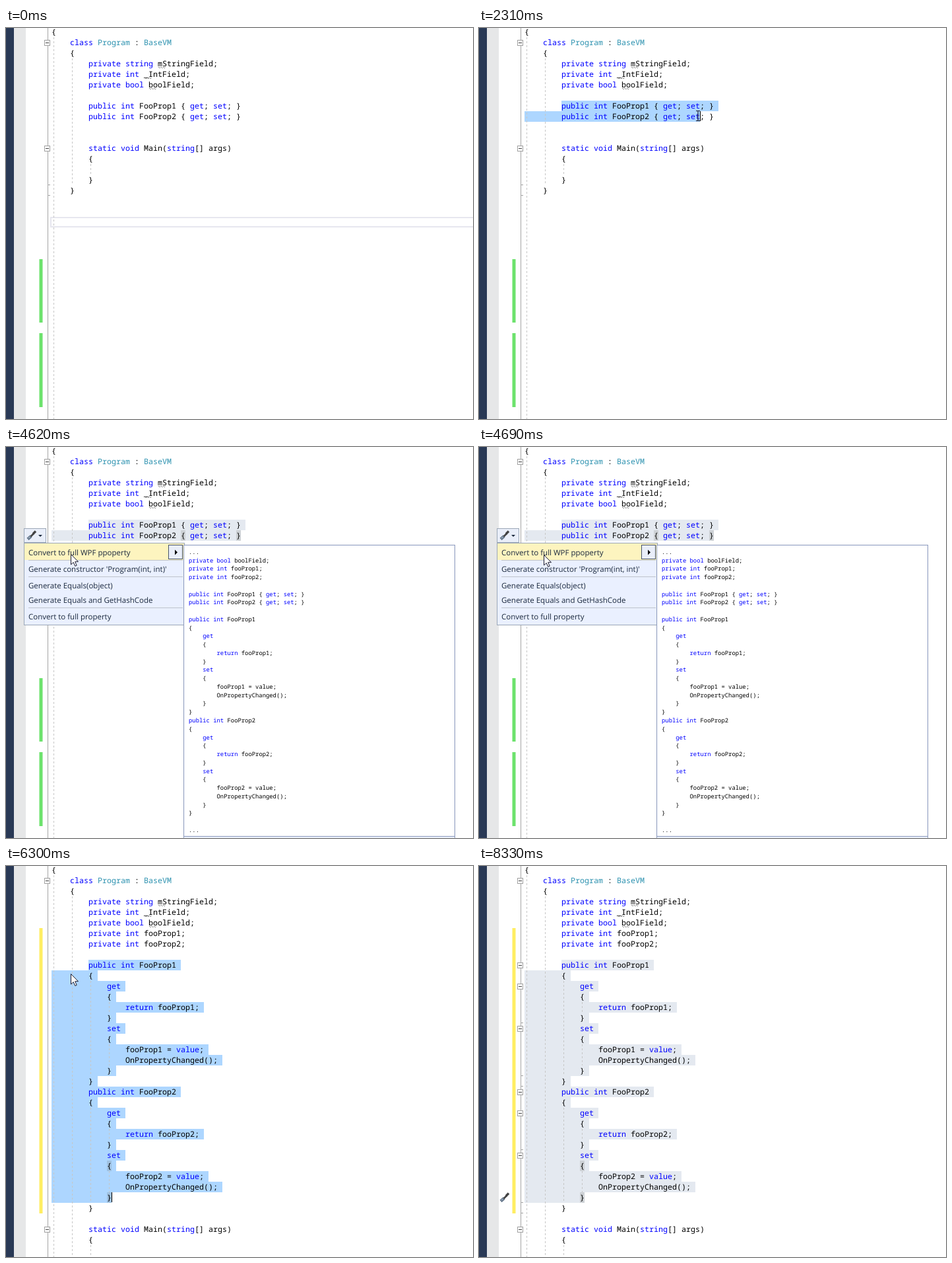
Write an HTML page that moves like this. It is 708 px wide and 592 px high and loops after 8400 ms.

```html
<!DOCTYPE html>
<html lang="en">
<head>
<meta charset="utf-8">
<title>Convert properties</title>
<style>
  html, body { margin: 0; width: 100%; height: 100%; overflow: hidden; background: #fff; }
  svg { display: block; width: 708px; height: 592px; }
  text { white-space: pre; text-rendering: geometricPrecision; }
  .code { font-family: "Noto Sans Mono", monospace; }
  .ui { font: 11.5px "Open Sans", sans-serif; fill: #1b293e; }
</style>
</head>
<body>
<svg id="stage" viewBox="0 0 708 592"></svg>
<script>
const LOOP = 8400, STEP = 70;
const LEFT = 69, CHAR = 7, ROW = 16;
const stage = document.getElementById('stage');

function el(tag, attrs, parent = stage) {
  const node = document.createElementNS('http://www.w3.org/2000/svg', tag);
  for (const key in attrs) node.setAttribute(key, attrs[key]);
  parent.append(node);
  return node;
}
const group = (parent = stage) => el('g', {}, parent);
const rect = (x, y, width, height, fill, parent, stroke = 'none') =>
  el('rect', { x, y, width, height, fill, stroke }, parent);
const path = (d, stroke, parent, fill = 'none', width = 1) =>
  el('path', { d, stroke, fill, 'stroke-width': width }, parent);
const show = (node, on) => node.setAttribute('visibility', on ? 'visible' : 'hidden');

// Code

const auto = n => `public int FooProp${n} { get; set; }`;
const field = n => `private int fooProp${n};`;
const full = n => [
  `public int FooProp${n}`, '{',
  '    get', '    {', `        return fooProp${n};`, '    }',
  '    set', '    {', `        fooProp${n} = value;`, '        OnPropertyChanged();', '    }',
  '}'
];
const indent = lines => lines.map(line => line && ' '.repeat(8) + line);
const head = ['{', '    class Program : BaseVM', '    {',
  ...indent(['private string mStringField;', 'private int _IntField;', 'private bool boolField;'])];
const main = ['static void Main(string[] args)', '{', ''];

const before = [...head, ...indent(['', auto(1), auto(2), '', '', ...main, '}']), '    }'];
const after = [...head, ...indent([field(1), field(2), '', ...full(1), ...full(2), '', ...main])];
const preview = ['...', 'private bool boolField;', field(1), field(2), '',
  auto(1), auto(2), '', ...full(1), ...full(2), '', '...'];

const keywords = /^(class|private|public|static|void|string|int|bool|get|set|return|value)$/;
const types = /^(Program|BaseVM)$/;

function drawCode(lines, x, baseline, char, pitch, parent, plain) {
  const box = el('g', { class: 'code', 'font-size': char / 0.6 }, parent);
  lines.forEach((line, row) => {
    for (const { 0: word, index } of line.matchAll(/\w+|[^\w\s]+/g)) {
      const fill = word === plain ? '#000' : keywords.test(word) ? '#00f' : types.test(word) ? '#2b91af' : '#000';
      el('text', { x: x + index * char, y: baseline + row * pitch, fill }, box).textContent = word;
    }
  });
}

// Editor furniture

const foldBox = (y, parent) => {
  rect(58.5, y - 3.5, 8, 8, '#fff', parent, '#a0a0a0');
  path(`M60 ${y + .5}h5`, '#444', parent);
};
const foldEnd = (y, parent) => path(`M64 ${y + .5}h3`, '#a5a5a5', parent);
const guide = (col, from, to, parent) =>
  el('path', { d: `M${LEFT + col * CHAR + 3.5} ${from}V${to}`, stroke: '#c6c6c6', 'stroke-dasharray': '3 3' }, parent);
const brace = (col, row, parent) =>
  rect(LEFT + col * CHAR, row * ROW - 2, CHAR, ROW, 'rgba(90,90,80,.17)', parent);

rect(0, 0, 708, 592, '#fff');
rect(0, 0, 12, 592, '#293955');
rect(12, 0, 18, 592, '#e6e7e8');

const currentLine = el('rect', { x: 68, width: 660, height: 14, fill: 'none', stroke: '#e7e7ef', 'stroke-width': 2 });
const selection = path('', 'none');
path('M63.5 0V592', '#a5a5a5');
foldBox(22);
guide(0, 14, 592);

const oldView = group();
guide(4, 46, 238, oldView);
guide(8, 206, 222, oldView);
rect(50.5, 350, 5, 96, '#6ce26c', oldView);
rect(50.5, 462, 5, 112, '#6ce26c', oldView);
foldBox(182, oldView);
foldEnd(237, oldView);
foldEnd(253, oldView);
const oldBraces = group();
brace(28, 8, oldBraces);
brace(40, 8, oldBraces);
drawCode(before, LEFT, 10, CHAR, ROW, oldView);

const newView = group();
rect(50.5, 94, 5, 432, '#ffee62', newView);
guide(4, 46, 592, newView);
guide(8, 574, 592, newView);
for (const y of [0, 192]) {
  guide(8, 174 + y, 318 + y, newView);
  guide(12, 206 + y, 222 + y, newView);
  guide(12, 270 + y, 302 + y, newView);
}
foldBox(550, newView);
brace(12, 28, newView);
brace(12, 31, newView);
drawCode(after, LEFT, 10, CHAR, ROW, newView);

const newFolds = group();
for (const y of [0, 192]) {
  [150, 182, 246].forEach(top => foldBox(top + y, newFolds));
  [237, 317, 333].forEach(end => foldEnd(end + y, newFolds));
}

// Hint dots below the three field names
[[231, 60], [210, 76], [217, 92]].forEach(([x, y]) =>
  el('path', { d: `M${x} ${y - .5}h11M${x + 1.5} ${y + .5}h9`, stroke: '#888', 'stroke-dasharray': '1.5 2' }));

const caret = rect(0, 0, 1, 15, '#000');

// Screwdriver, button and menu

const button = group();
rect(27.5, 123.5, 33, 21, '#e9eef9', button, '#9ba7b7');
path('M49 133h6l-3 3z', 'none', button, '#1b293e');

function tool(handle, shaft) {
  const icon = group();
  path('M33 139.5L38 135', handle, icon, 'none', 4.5);
  path('M34 138L36.5 136', '#c3cfdf', icon, 'none', 1);
  path('M37.5 135.5L42 131', shaft, icon, 'none', 2.6);
  path('M41 131.5L45 127.5', shaft, icon, 'none', 3.4);
  return icon;
}
const grayTool = tool('#66788c', '#424242');
const colorTool = tool('#4c78cf', '#8a6238');

const menu = group();
rect(27.5, 145.5, 243, 124, '#eaf0ff', menu, '#9ba7b7');
const hover = group(menu);
rect(28, 146, 242, 25, '#fdf4bf', hover);
rect(246.5, 148.5, 21, 21, '#e9eef9', hover, '#46536b');
path('M256 155.5v8l4-4z', 'none', hover, '#000');
[171.5, 196.5, 243.5].forEach(y => path(`M34 ${y}H268`, '#bec3cb', menu));
[['Convert to full WPF ppoperty', 164], ["Generate constructor 'Program(int, int)'", 189],
 ['Generate Equals(object)', 214], ['Generate Equals and GetHashCode', 236],
 ['Convert to full property', 261]].forEach(([label, y]) =>
  el('text', { class: 'ui', x: 34, y }, menu).textContent = label);

const flyout = group();
rect(269.5, 148.5, 411, 460, '#eaf0ff', flyout, '#8e9bbc');
rect(270.5, 149.5, 409, 439.5, '#fff', flyout);
path('M270 589.5H680', '#8e9bbc', flyout);
drawCode(preview, 277, 161.8, 5.32, 12.76, flyout, 'value');

// Pointers

const arrow = path('M.5 .5V16L4.2 12.6L6.8 18.4L9.2 17.3L6.7 11.7H11.5Z', '#1c1c30', stage, '#fff');
const beam = path('M-3 -7.5h2.5l.5 .5l.5 -.5h2.5M0 -7V7M-3 7.5h2.5l.5 -.5l.5 .5h2.5', '#1c1c30', stage, 'none', 1.2);

const smooth = p => p * p * (3 - 2 * p);
const out = p => 1 - (1 - p) ** 1.7;
const into = p => p ** 1.4;
const linear = p => p;

// time, x, y, pointer and easing on the way there
const route = [
  [0, 640, 630, beam, linear],
  [210, 640, 630, beam, linear],
  [1120, 142, 150, beam, out],
  [1330, 128, 123, beam, out],
  [1680, 128, 123, beam, linear],
  [2520, 370, 135, beam, smooth],
  [2730, 370, 135, beam, linear],
  [3430, 46, 133, arrow, smooth],
  [4340, 46, 133, arrow, linear],
  [4620, 98, 162, arrow, out],
  [4690, 98, 163, arrow, linear],
  [6510, 98, 163, arrow, linear],
  [6790, 307, 119, beam, smooth],
  [7000, 307, 119, beam, linear],
  [7280, 270, 239, beam, linear],
  [7910, 700, 612, beam, into],
  [LOOP, 700, 612, beam, linear]
];

function pointerAt(t) {
  const i = route.findIndex(key => key[0] > t);
  const [t0, x0, y0] = route[i - 1];
  const [t1, x1, y1, shape, ease] = route[i];
  const p = ease((t - t0) / (t1 - t0));
  return { x: x0 + (x1 - x0) * p, y: y0 + (y1 - y0) * p, shape: t === t0 ? route[i - 1][3] : shape };
}

function selectionPath(lines, first, last, endCol) {
  let d = '';
  for (let row = first; row <= last; row++) {
    const x = row === first ? LEFT + 8 * CHAR : LEFT;
    const end = LEFT + (row === last ? endCol : lines[row].length + 1) * CHAR;
    d += `M${x} ${row * ROW - 2}H${end}v${ROW}H${x}z`;
  }
  return d;
}

const within = (t, from, to) => t >= from && t < to;

function render(time) {
  const t = Math.floor(time / STEP) * STEP;
  const pointer = pointerAt(t);
  const converted = t >= 6160;

  for (const shape of [arrow, beam]) show(shape, shape === pointer.shape);
  pointer.shape.setAttribute('transform', `translate(${Math.round(pointer.x)} ${Math.round(pointer.y)})`);

  show(currentLine, t < 1820);
  currentLine.setAttribute('y', t < 1750 ? 287 : 111);

  let row = 8, col = 41;
  if (t < 2520) {
    row = pointer.y > 126 ? 8 : 7;
    col = Math.max(8, Math.min(41, Math.round((pointer.x - LEFT) / CHAR)));
  }
  if (converted) [row, col] = [31, 13];
  const selected = t >= 1820;
  const unfocused = within(t, 3850, 6160) || t >= 8330;
  selection.setAttribute('d', !selected ? '' :
    converted ? selectionPath(after, 9, row, col) : selectionPath(before, 7, row, col));
  selection.setAttribute('fill', unfocused ? '#e4e9f0' : '#add6ff');

  caret.setAttribute('x', LEFT + col * CHAR);
  caret.setAttribute('y', row * ROW - 2);
  show(caret, within(t, 1750, 2800) || within(t, 3220, 3710) || within(t, 6160, 6580) ||
    within(t, 7070, 7490) || within(t, 7980, 8330));

  show(oldView, !converted);
  show(oldBraces, !converted && selected && row === 8 && col === 41);
  show(newView, converted);
  show(newFolds, t >= 7420);

  show(button, within(t, 3360, 6020));
  show(grayTool, within(t, 3010, 6020) || t >= 6580);
  grayTool.setAttribute('transform', `translate(0 ${converted ? 368 : 0})`);
  show(colorTool, within(t, 6020, 6160));

  show(menu, within(t, 3850, 6020));
  menu.setAttribute('opacity', Math.min(1, (t - 3780) / 350));
  show(hover, within(t, 4480, 6020));
  show(flyout, within(t, 4550, 6020));
}

const start = performance.now();
function tick() {
  render((performance.now() - start) % LOOP);
  requestAnimationFrame(tick);
}
render(0);
requestAnimationFrame(tick);
</script>
</body>
</html>
```
